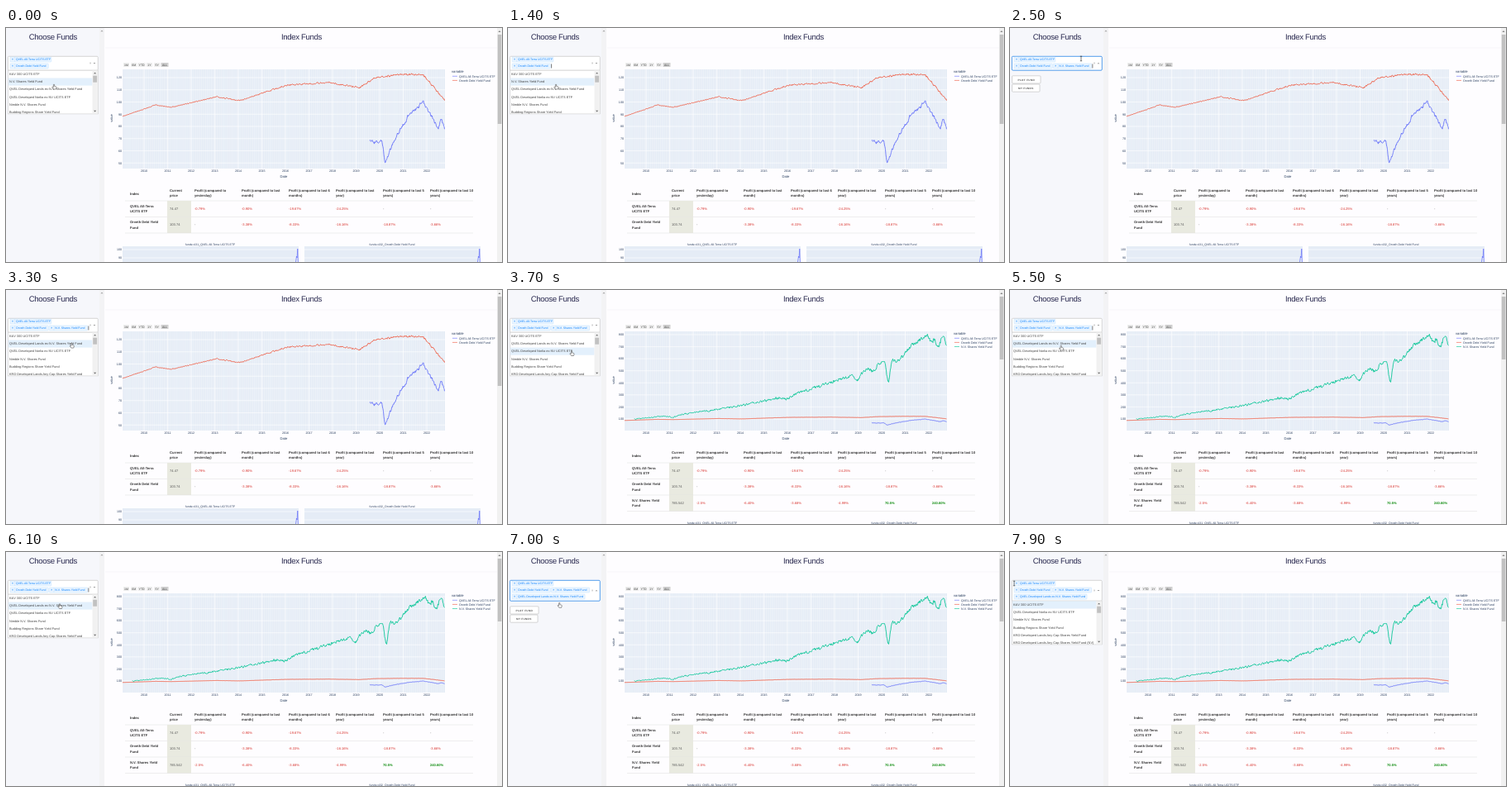
Write an HTML page that moves like this. It is 600 by 283 pixels and loops after 8 s.

```html
<!DOCTYPE html>
<html lang="en">
<head>
<meta charset="utf-8">
<title>Index Funds</title>
<style>
html, body { margin: 0; width: 100%; height: 100%; overflow: hidden; background: #fefdff; }
svg { display: block; width: 100vw; height: 100vh; font-family: "Liberation Sans", Arial, sans-serif; text-rendering: geometricPrecision; }
.line { fill: none; stroke-width: .85; stroke-linejoin: round; vector-effect: non-scaling-stroke; }
</style>
</head>
<body>
<svg viewBox="0 0 600 283">
  <g id="page"></g><g id="before"></g><g id="after"></g><g id="picker"></g><g id="mouse"></g>
</svg>
<script>
const $ = id => document.getElementById(id);
const BLUE = '#636efa', RED = '#ef553b', GREEN = '#00c493', INK = '#2a3f5f';
const WORLD = 'QVEL All-Terra UCITS ETF', BOND = 'Orveth Debt Yield Fund', SHARES = 'N.V. Shares Yield Fund';
const LANDS = 'QVEL Developed Lands ex-N.V. Shares Yield Fund';
const CAPS = 'KRD Developed Lands Any Cap Shares Yield Fund';
const FUNDS = ['K&amp;V 300 UCITS ETF', SHARES, LANDS, 'QVEL Developed Norlia ex NV UCITS ETF',
  'Nimble N.V. Shares Fund', 'Budding Regions Share Yield Fund', CAPS, CAPS + ' (NV)'];

// y is the middle of the capitals
const text = (x, y, s, size, fill = '#333', more = '') =>
  `<text x="${x}" y="${y + size * .36}" font-size="${size}" fill="${fill}" ${more}>${s}</text>`;
const rect = (x, y, w, h, fill, more = '') =>
  `<rect x="${x}" y="${y}" width="${w}" height="${h}" fill="${fill}" ${more}/>`;
const path = (d, stroke, width = .6, more = 'fill="none"') =>
  `<path d="${d}" stroke="${stroke}" stroke-width="${width}" ${more}/>`;
const arrow = (x, y, dir, fill = '#666', r = 1.6) =>
  `<path d="M${x - r} ${y + dir * r / 2}h${2 * r}l${-r} ${-dir * r}z" fill="${fill}"/>`;
const MID = 'text-anchor="middle"', END = 'text-anchor="end"', BOLD = 'font-weight="bold"';

// Jagged price line: a smooth height plus a seeded random wobble
function curve(height, from, noise, color, seed, more = '') {
  const rnd = () => (seed = seed * 16807 % 2147483647) / 2147483647 - .5;
  let d = '', wobble = 0;
  for (let x = from; x <= 530.5; x += .5) {
    wobble = wobble * .5 + rnd() * noise * (.3 + (x - 141) / 390);
    d += `${d ? 'L' : 'M'}${x} ${(height(x) + wobble).toFixed(2)}`;
  }
  return `<path class="line" d="${d}" stroke="${color}" ${more}/>`;
}
function through(points) {
  const p = points.split(' ').map(s => s.split(',').map(Number));
  return x => {
    const i = Math.max(1, p.findIndex(q => q[0] >= x)), [x0, y0] = p[i - 1], [x1, y1] = p[i];
    return y0 + (y1 - y0) * (x - x0) / (x1 - x0);
  };
}
const dip = (x, at, width) => Math.exp(-(((x - at) / width) ** 2));
const bondY = through('141,107 181,93 200,96 255,83 282,88 340,69 390,66 428,72 446,60 480,56 505,57 531,88');
const worldY = through('440,138 455,138 458.5,163 469,137 487,106 505,89 517,110 523,120 527,110 531,126');
// Steady compound growth, levelling off, with market slumps as [x, depth, width]
const SLUMPS = [[200, 15, 7], [338, 25, 8], [423, 60, 5], [442, 50, 4], [460, 185, 3], [473, 60, 9], [512, 55, 3], [520, 100, 4], [531, 95, 3]];
const sharesY = x => 170.6 - .146 * SLUMPS.reduce((v, [at, depth, width]) => v - depth * dip(x, at, width),
  100 * Math.exp(.00585 * (Math.min(x, 507) - 153)));

function chart(top, step, y0, gap) {
  let s = rect(141, 50, 390, 120, '#e5ecf6'), months = '', years = '', rows = '';
  for (let m = 0; m < 164; m++) months += `M${(141.6 + m * 2.375).toFixed(2)} 50v120`;
  for (let i = 0; i < 13; i++) {
    years += `M${167 + i * 28.5} 50v120`;
    s += text(167 + i * 28.5, 172.4, 2010 + i, 3.7, INK, MID);
  }
  for (let i = 0; i < 8; i++) {
    rows += `M141 ${y0 + i * gap}h390`;
    s += text(140, y0 + i * gap, top - i * step, 3.7, INK, END);
  }
  return s + path(months, '#fff', .5, 'opacity=".6"') + path(years + rows, '#fff');
}
const legend = items => items.map(([name, color], i) =>
  path(`M540 ${58.3 + i * 5.1}h6`, color, .6) + text(548, 58.3 + i * 5.1, name, 3.65, INK)).join('');

const column = i => i ? 171 + i * 57 : 198;
function row(y, name, tail, values) {
  let s = rect(195, y - 9.5, 29, 19.5, '#e9eae0') + path(`M144 ${y + 10}h421`, '#ddd', .5)
    + text(150, y - 3, name, 4.1, '#333', BOLD) + text(150, y + 3.3, tail, 4.1, '#333', BOLD);
  values.split(' ').forEach((v, i) => {
    const up = i > 0 && v[0] != '-';
    s += text(column(i), y, v, 4.1, i == 0 || v == '-' ? '#555' : up ? '#0a8a0a' : '#d8302a', up ? BOLD : '');
  });
  return s;
}
const facetTitles = y => text(247, y, 'funds=431_' + WORLD, 3.5, INK, MID)
  + text(467, y, 'funds=432_' + BOND, 3.5, INK, MID);
const thumb = h => rect(594.8, 8, 4.6, h, '#c1c1c1');

function buildPage() {
  let s = rect(0, 0, 113, 283, '#f6f7fb') + rect(113, 0, 6, 283, '#f3f3f5') + arrow(116, 3.5, 1, '#999')
    + path('M120 24h474', '#f0eff5') + rect(594, 0, 6, 283, '#f1f1f1') + arrow(597, 4, 1)
    + text(56.8, 10.3, 'Choose Funds', 9.6, '#2a2a50', MID + ' letter-spacing="-.35"')
    + text(357.5, 10.3, 'Index Funds', 9.6, '#2a2a50', MID + ' letter-spacing="-.35"');
  ['1M', '6M', 'YTD', '1Y', '5Y', 'ALL'].forEach((b, i) => {
    const x = 145.5 + 9.3 * i, w = b.length * 2 + 3;
    s += rect(x - w / 2, 42, w, 5, i == 5 ? '#d0d0d0' : '#eee') + text(x, 44.4, b, 3.5, '#444', MID);
  });
  s += text(539, 52.6, 'variable', 4.2, INK) + text(336, 179.2, 'Date', 4.2, INK, MID)
    + `<g transform="translate(127.5 109) rotate(-90)">${text(0, 0, 'value', 4, INK, MID)}</g>`
    + text(150, 200, 'Index', 4.2, '#333', BOLD) + path('M144 209h421', '#ddd', .5);
  ['Current|price', '|yesterday)', ' last|month)', ' last 6|months)', ' last|year)', ' last 5|years)', ' last 10|years)'].forEach((h, i) => {
    const [a, b] = h.split('|');
    s += text(column(i), 196.8, (i ? 'Profit (compared to' : '') + a, 4.15, '#333', BOLD)
      + text(column(i), 203, b, 4.15, '#333', BOLD);
  });
  s += row(218.5, 'QVEL All-Terra', 'UCITS ETF', '74.47 -0.79% -0.90% -19.67% -24.25% - -')
    + row(238, 'Orveth Debt Yield', 'Fund', '103.74 - -3.38% -8.33% -16.16% -18.87% -3.66%');
  $('page').innerHTML = s;

  const prices = more => curve(worldY, 440, 3.2, BLUE, 23, more) + curve(bondY, 141, 1.8, RED, 11, more);
  const two = [[WORLD, BLUE], [BOND, RED]];
  const facet = x => rect(x, 264, 213, 19, '#e5ecf6') + path(`M${x} 268h213M${x} 278h213`, '#fff')
    + path(`M${x + 209.5} 283l1 -7l.6 2l.7 -11l.6 16`, BLUE, .7);
  $('before').innerHTML = chart(120, 10, 60, 14.75) + prices()
    + legend(two) + thumb(108) + facetTitles(262) + facet(141) + facet(361)
    + text(140, 268, 100, 3.6, INK, END) + text(140, 278, 90, 3.6, INK, END);
  $('after').innerHTML = chart(800, 100, 54, 14.57) + prices('transform="matrix(1 0 0 .099 0 147.2)"')
    + curve(sharesY, 153, 3.2, GREEN, 37) + legend([...two, [SHARES, GREEN]]) + thumb(76)
    + row(257.5, 'N.V. Shares Yield', 'Fund', '785.542 -2.5% -6.40% -3.68% -4.99% 70.5% 240.60%')
    + facetTitles(281.5);
}

const tag = (name, x, y, w) => rect(x, y - 3, w, 6, '#ebf5ff', 'rx=".8" stroke="#c2e0ff" stroke-width=".5"')
  + path(`M${x + 5.6} ${y - 3}v6`, '#c2e0ff', .5) + text(x + 2.8, y, '×', 4, '#007eff', MID)
  + text(x + 7, y, name, 3.5, '#007eff');
const button = (y, label, w) => rect(2.5, y - 4.6, w, 9.2, '#fff', 'rx="1" stroke="#bbb" stroke-width=".6"')
  + text(2.5 + w / 2, y, label, 3.1, '#555', `${MID} ${BOLD} letter-spacing=".3"`);

function drawPicker(t, mouseY) {
  const chosen = [WORLD, BOND, SHARES, LANDS].slice(0, t < 1700 ? 2 : t < 6500 ? 3 : 4);
  const open = t < 1700 || t >= 2650 && t < 6500 || t >= 7600;
  let tags = '', x = 5, y = 38;
  for (const name of chosen) {
    const w = name.length * 1.74 + 8;
    if (x + w > 100) { x = 5; y += 8; }
    tags += tag(name, x, y, w);
    x += w + 1;
  }
  const bottom = y + 5.2, middle = (34 + bottom) / 2;
  let s = rect(2.3, 34.3, 109, bottom - 34.3, '#fff', `rx="1.2" stroke="${open ? '#ccc' : '#2684e8'}" stroke-width=".8"`)
    + tags + text(102, middle, '×', 4.5, '#999', MID) + arrow(107, middle, open ? -1 : 1, '#888', 1.4);
  if (t % 1000 >= 50 && t % 1000 < 550) s += path(`M${x + .3} ${y - 2.5}v5`, '#222');
  if (open) {
    const pitch = 9.1, hover = Math.max(0, Math.floor((mouseY - bottom) / pitch));
    s += rect(2.3, bottom, 109, 52.7, '#fff', 'stroke="#ccc" stroke-width=".6"');
    FUNDS.filter(f => !chosen.includes(f)).slice(0, 6).forEach((f, i) => {
      if (i == hover) s += rect(2.8, bottom + .2 + i * pitch, 101.7, pitch, '#e3f0fc');
      s += text(4, bottom + 4.6 + i * pitch, f, 3.9, '#444');
    });
    s += rect(104.5, bottom + .3, 6.3, 52.1, '#f1f1f1') + rect(105.2, bottom + 6.5, 4.9, 8, '#c1c1c1')
      + arrow(107.6, bottom + 3.3, 1) + arrow(107.6, bottom + 49.4, -1);
  } else {
    s += button(bottom + 11.2, 'PLOT FUND', 34.5) + button(bottom + 21.4, 'MY FUNDS', 33.5);
  }
  $('picker').innerHTML = s;
}

// Pointer trips: start, end, x, y
const TRIPS = [[1750, 2300, 86, 37], [2700, 3600, 77, 73.5], [4250, 4800, 61, 68],
  [5300, 6050, 65, 62.5], [6950, 7300, 16, 41], [7450, 7850, 5, 38]];
function pointer(t) {
  let x = 58, y = 68;
  for (const [from, to, tx, ty] of TRIPS) {
    const k = Math.min(1, Math.max(0, (t - from) / (to - from))), e = k * k * (3 - 2 * k);
    x += (tx - x) * e;
    y += (ty - y) * e;
  }
  return [x, y];
}
const HAND = path('M-.6 .4q.6 -.8 1.2 0v2l2 .6q.6 .3 .4 1l-.6 2h-2.8l-1.8 -2.6q.4 -.7 1.6 .2z', '#333', .5, 'fill="#fff"');
const BEAM = path('M-1.2 -2.8h2.4M0 -2.8v5.6M-1.2 2.8h2.4', '#222');

function render(t) {
  const [x, y] = pointer(t), plotted = t >= 3700;
  $('before').style.display = plotted ? 'none' : '';
  $('after').style.display = plotted ? '' : 'none';
  drawPicker(t, y);
  $('mouse').setAttribute('transform', `translate(${x} ${y})`);
  $('mouse').innerHTML = y < 51 ? BEAM : HAND;
}

buildPage();
const start = performance.now();
(function tick() {
  render((performance.now() - start) % 8000);
  requestAnimationFrame(tick);
})();
</script>
</body>
</html>
```
